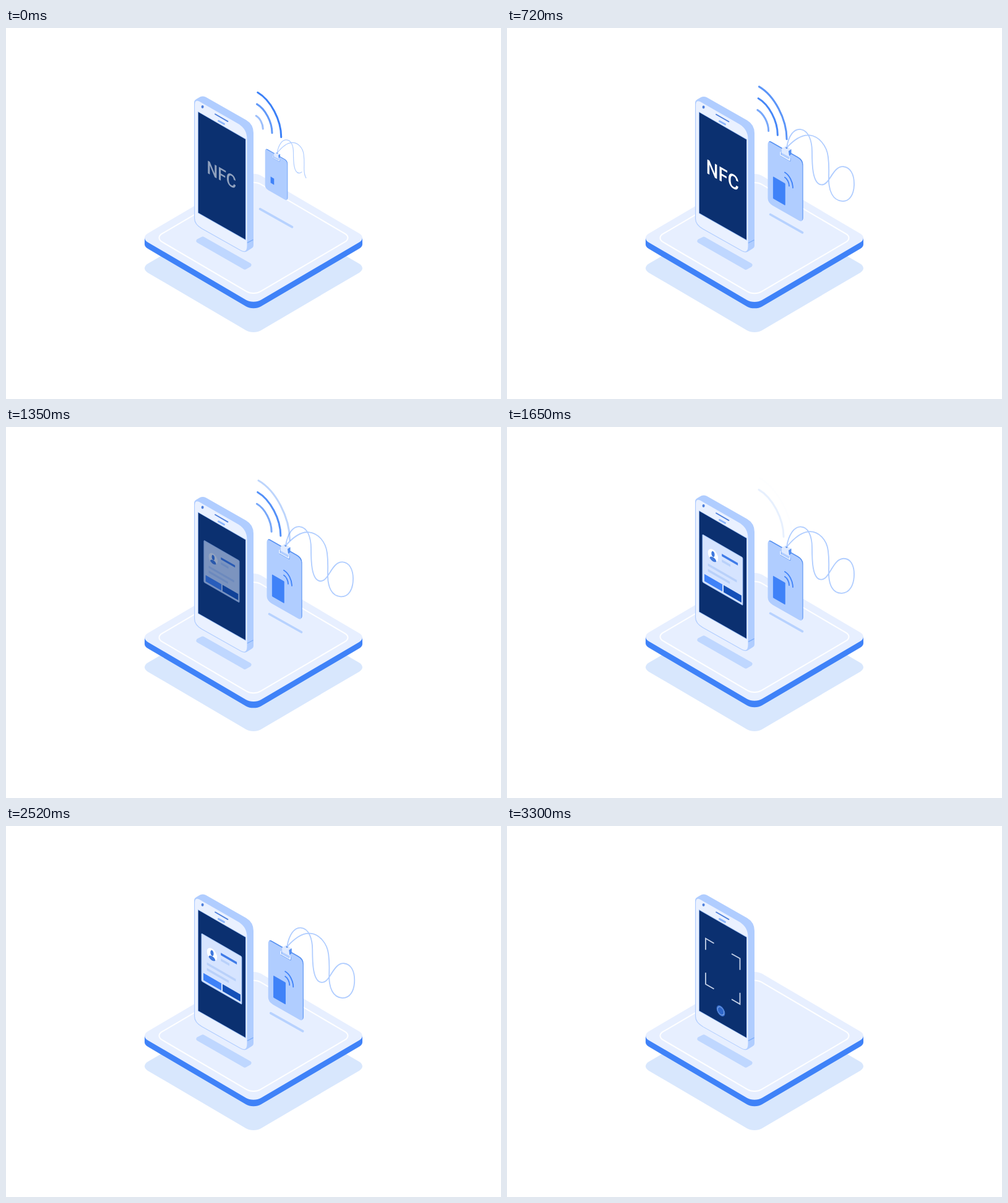
Write an HTML page that moves like this. It is 800x600 px and loops after 3.33 s.

```html
<!DOCTYPE html>
<html lang="en">
<head>
<meta charset="utf-8">
<title>NFC badge scan</title>
<style>
  html, body { margin: 0; width: 100%; height: 100%; overflow: hidden; background: #fff; }
  svg { display: block; width: 800px; height: 600px; }
  text { font: 500 32px Roboto, Arial, sans-serif; text-anchor: middle; fill: #fff; }
  .line { fill: none; stroke-linecap: round; stroke-linejoin: round; }
</style>
</head>
<body>
<svg viewBox="0 0 800 600">
  <defs>
    <rect id="tile" x="-105.7" y="-105.7" width="211.4" height="211.4" rx="14" transform="matrix(.866 .509 -.866 .509 0 0)"/>
    <path id="badge" d="M-28 -60Q-28 -66 -23 -63L20 -38.5Q28 -34 28 -26L28 60Q28 66 23 63.5L-20 39Q-28 34 -28 27Z"/>
  </defs>

  <use href="#tile" x="400" y="388.5" fill="#d8e7fd"/>

  <g id="base">
    <g fill="#3f82f8">
      <use href="#tile" x="400" y="349.9"/>
      <rect x="224" y="339.5" width="352" height="10.4"/>
    </g>
    <use href="#tile" x="400" y="339.5" fill="#e7efff"/>
    <rect x="-91.850" y="-91.850" width="183.7" height="183.7" rx="13" transform="matrix(.866 .509 -.866 .509 400 339.5)"
      fill="none" stroke="#fff" stroke-width="2" vector-effect="non-scaling-stroke"/>
    <path d="M311 344.5L318 341L393 383.5L386 387.5Z" fill="#bfd7ff" stroke="#bfd7ff" stroke-width="7" stroke-linejoin="round"/>
    <path id="cardShadow" class="line" d="M425.5 301.5L477.5 330.8" stroke="#b7d2ff" stroke-width="3.6"/>
  </g>

  <g id="card">
    <use href="#badge" x=".6" y="-1" fill="#5590f2"/>
    <use href="#badge" x="-.5" y=".3" fill="#b0cdff"/>
    <path id="chip" d="M-9.4 -22.7L9.4 -11.9V22.7L-9.4 11.9Z" fill="#3f82f8" stroke="#3f82f8" stroke-linejoin="round"/>
    <g class="line" stroke="#3f82f8" stroke-width="1.8">
      <path id="ping0" pathLength="100"/>
      <path id="ping1" pathLength="100"/>
    </g>
    <path class="line" d="M-8 -47V-42.500L7 -34V-38" stroke="#5590f2" stroke-width="1.6" transform="translate(.6 .8)"/>
    <path class="line" d="M-8 -47V-42.500L7 -34V-38" stroke="#fff" stroke-width="1.4"/>
    <path d="M-6 -53L0 -57L9 -52L7 -50V-39L-6 -46Z" fill="#dfeaff"/>
    <path d="M5 -49L9.500 -52V-44L6 -41Z" fill="#5590f2"/>
    <circle cx="2" cy="-54.500" r="1.6" fill="#3f7be0"/>
    <path id="cord" fill="none" stroke="#b0cdff" stroke-width="1.8" pathLength="100"
      d="M0 0C3 -20 12 -32 22 -32C36 -32 41 -14 41 2C41 20 41 54 56 54C70 54 74 21 92 21C103 21 109 32 109 47C109 65 101 77 89 77C74 77 68 62 68 44C68 30 69 24 67 8C65 -10 52 -24 37 -24C24 -24 10 -12 0 0"/>
  </g>

  <g id="waves" class="line" stroke="#3b80f7" stroke-width="3"></g>

  <g id="phone">
    <path d="M304 121Q304 117 308 115L314 111.500Q318 109.500 323 112L388 149Q400 156 400 170V351Q400 355 397 356.500L389 361.500Q385 363.500 380 361L316 325Q304 318 304 308Z" fill="#b0cdff"/>
    <path d="M305.200 124Q305.200 115.500 312 118.800L376 155.500Q389.500 164 389.500 180V353Q389.500 364.500 380 359.800L317 324.300Q305.200 317.500 305.200 308Z" fill="#eaf1ff"/>
    <path d="M390 347.500L399.500 342.500" stroke="#7faef8" stroke-width="1.3"/>
    <path d="M310.800 136.300L387 180.200V342.300L310.800 299Z" fill="#0b3070" stroke="#9fc1fc" stroke-width="1.6" paint-order="stroke"/>
    <ellipse cx="317.600" cy="127.700" rx="2" ry="2.400" fill="#4d7fdc"/>
    <path class="line" d="M338 139.500L358.500 151.300" stroke="#4d7fdc" stroke-width="1.8"/>
    <path class="line" d="M343.500 150.500L352.500 155.500" stroke="#8db6fb" stroke-width="3"/>

    <g id="label"><text y="11.4">NFC</text></g>

    <g id="profile">
      <g transform="matrix(.866 .5 0 1 316 174)">
        <rect width="75" height="77" rx="1.5" fill="#d6e4ff" stroke="#a9c9ff"/>
        <circle cx="19.600" cy="24.200" r="9.500" fill="#fff"/>
        <ellipse cx="19.600" cy="22" rx="3" ry="4.500" fill="#3f78dd"/>
        <path d="M13.300 31.300Q14 27 19.600 27Q25.200 27 25.900 31.300Q19.600 36.500 13.300 31.300Z" fill="#3f78dd"/>
        <rect x="36" y="13.200" width="30" height="4" fill="#3f7be8"/>
        <g fill="#b9d1fa">
          <rect x="36" y="22.500" width="16" height="4"/>
          <rect x="10" y="41.600" width="54" height="4"/>
          <rect x="10" y="50.600" width="41" height="4"/>
        </g>
        <rect x="3.500" y="62.300" width="33.500" height="11.500" fill="#3f82f8"/>
        <rect x="39.300" y="62.300" width="33.400" height="11.500" fill="#1450b8"/>
      </g>
    </g>

    <g id="finder">
      <path d="M321 200.500V182L334.500 190M363 207L376.500 214.500V233M321 237.500V256L334.500 263.700M363 280.500L376.500 288.300V270" fill="none" stroke="#e6eefc" stroke-width="1.8"/>
      <g transform="matrix(.866 .5 0 1 345.500 299.200)">
        <circle r="8" fill="#3f7be0"/>
        <circle r="6" fill="#3570d8" stroke="#9dc0fb"/>
      </g>
    </g>
  </g>
</svg>
<script>
const LOOP = 3330;
const $ = id => document.getElementById(id);
const set = (el, name, value) => el.setAttribute(name, value);
const fade = (el, value) => set(el, 'opacity', value.toFixed(3));

// Quarter ellipse: leaves along the isometric axis, ends vertical
function arc(x0, y0, x1, y1) {
  const k = .552, cy = y0 + .58 * (x1 - x0);
  return `M${x0} ${y0}C${x0 + k * (x1 - x0)} ${y0 + k * (cy - y0)} ${x1} ${y1 + k * (cy - y1)} ${x1} ${y1}`;
}

// Piecewise interpolation through t, v pairs
function keys(t, k, ease = x => x) {
  if (t <= k[0]) return k[1];
  for (let i = 2; i < k.length; i += 2) {
    if (t <= k[i]) return k[i - 1] + (k[i + 1] - k[i - 1]) * ease((t - k[i - 2]) / (k[i] - k[i - 2]));
  }
  return k[k.length - 1];
}
const smooth = x => x * x * (3 - 2 * x);
const decay = (t, end, power) => Math.pow(Math.max(0, 1 - t / end), power);
const grow = (cx, cy, s) => `translate(${cx} ${cy}) scale(${s}) translate(${-cx} ${-cy})`;

set($('ping0'), 'd', arc(-1, -6.5, 6, 7.5));
set($('ping1'), 'd', arc(-1, -14.5, 12, 10.5));

const waves = Array.from({ length: 7 }, () =>
  $('waves').appendChild(document.createElementNS('http://www.w3.org/2000/svg', 'path')));

function drawWaves(t) {
  const front = keys(t, [0, .05, 360, .42, 1080, 1.28, 1650, 2.02, 1800, 2.2]);
  const dim = keys(t, [1300, 1, 1650, .12, 1680, 0]);
  waves.forEach((path, i) => {
    const e = front - (i - 2) * .32;
    set(path, 'd', arc(404 + 4 * e, 145 - 59 * e, 413 + 46 * e, 162 + 21 * e));
    fade(path, dim * keys(e, [-.06, 0, 0, .38, .1, .62, .31, .75, .6, 1, .8, 1, 1, .35, 1.07, 0]));
  });
}

function drawCard(t, bob) {
  const scale = 1 - .36 * decay(t, 600, 1.79);
  const slide = -15 * decay(t, 400, 2) + keys(t, [2450, 0, 2820, 24, 3020, 40], smooth);
  const alpha = keys(t, [2740, 1, 2820, .92, 3020, 0]);
  const x = 450 + slide + 5.5 * (1 - scale);
  const y = 248.5 + slide * .57 - 2.6 * bob - 8 * (1 - scale);
  set($('card'), 'transform', `translate(${x} ${y}) scale(${scale})`);
  fade($('card'), alpha);
  set($('cardShadow'), 'transform', `translate(${slide} ${slide * .58})`);
  fade($('cardShadow'), alpha);

  set($('chip'), 'transform', `translate(-10.2 15.5) scale(${1 - .56 * decay(t, 450, 2)})`);
  [[200, 380], [400, 640]].forEach(([from, to], i) => {
    const p = keys(t, [from, 0, to, 100]);
    set($('ping' + i), 'stroke-dasharray', `${p} 200`);
    fade($('ping' + i), p > 0 ? 1 : 0);
  });

  const sway = .035 - .095 * Math.cos(2 * Math.PI * (t - 1930) / 1960);
  const gap = decay(t, 480, 1.5) + keys(t, [2520, 0, 2820, 1, 3020, 2.4]);
  const a = 50 - 16 * gap, b = 50 + 15 * gap;
  set($('cord'), 'transform', `matrix(1 ${sway} 0 1 2 -54.5)`);
  set($('cord'), 'stroke-dasharray', gap ? `${a} ${b - a} ${101 - b} 0` : 'none');
}

function drawScreen(t) {
  const size = keys(t, [0, .9, 280, 1, 1150, 1, 1300, .85], smooth);
  set($('label'), 'transform', `matrix(${.866 * size} ${.5 * size} 0 ${size} 348.3 237.6)`);
  fade($('label'), keys(t, [0, .55, 200, 1, 1150, 1, 1300, 0]));
  set($('profile'), 'transform', grow(348.5, 231.5, keys(t, [1250, .8, 1480, 1, 2940, 1, 3110, .85], smooth)));
  fade($('profile'), keys(t, [1250, 0, 1430, 1, 2940, 1, 3110, 0]));
  fade($('finder'), keys(t, [3110, 0, 3300, .85]));
}

function frame(now) {
  const t = now % LOOP;
  const bob = (1 - Math.cos(8 * Math.PI * t / LOOP)) / 2;
  set($('base'), 'transform', `translate(0 ${1.4 * bob - .2})`);
  set($('phone'), 'transform', `translate(0 ${2.9 * bob - .2})`);
  drawCard(t, bob);
  drawWaves(t);
  drawScreen(t);
}

let start;
function tick(now) {
  start ??= now;
  frame(Math.max(0, now - start));
  requestAnimationFrame(tick);
}
frame(0);
requestAnimationFrame(tick);
</script>
</body>
</html>
```
